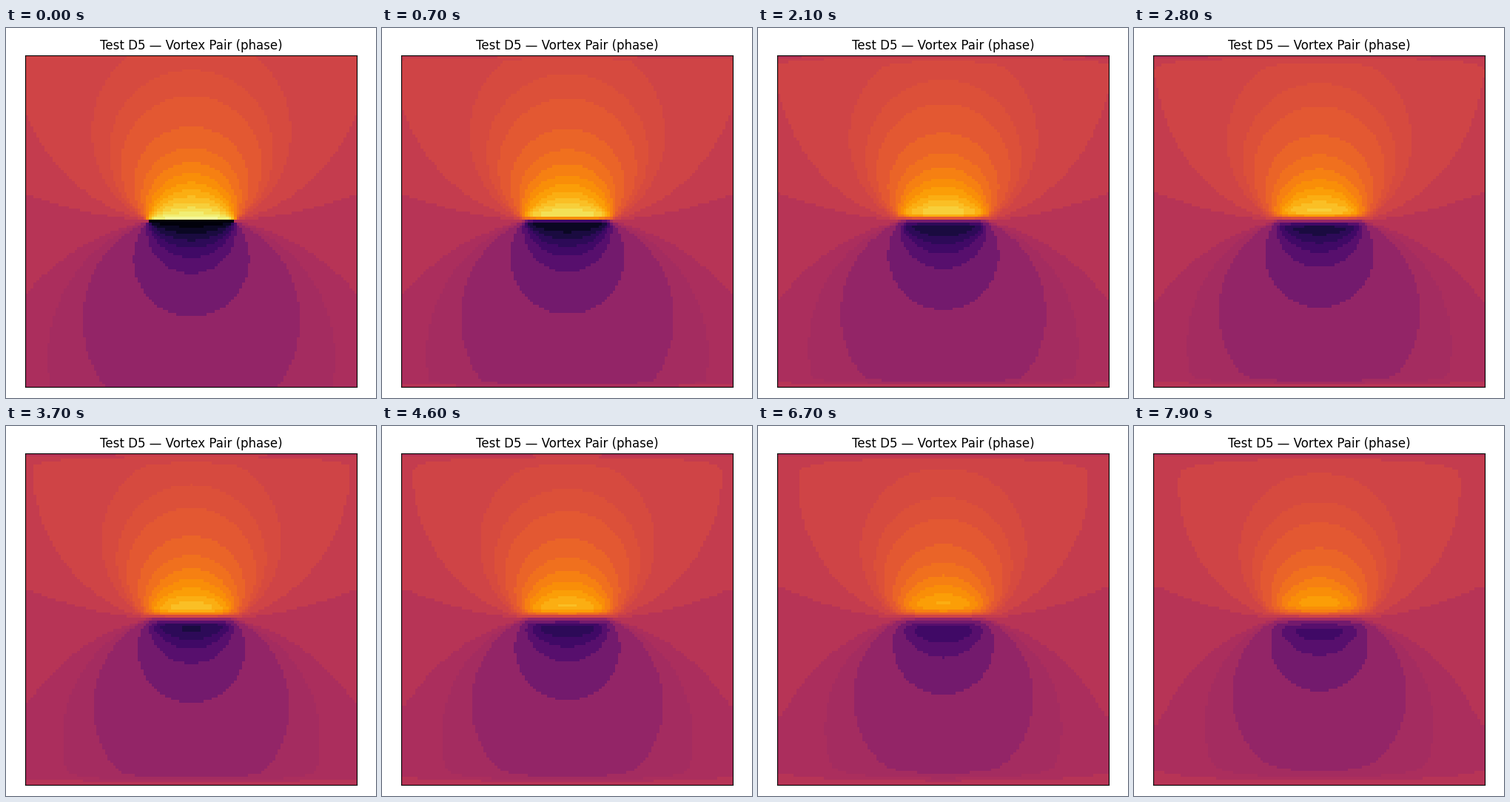
A matplotlib script for the animation above (8 s loop, 500 by 500 pixels).

```python
import matplotlib.pyplot as plt
import numpy as np
from matplotlib.animation import FuncAnimation
from matplotlib.colors import from_levels_and_colors

FRAMES = 80
INTERVAL = 100
CELLS = 121
HALF_GAP = 15.95      # vortex distance from the centre, in cells
DIFFUSION = 0.045     # per step
DAMPING = 0.003       # per step


def vortex_pair():
    axis = np.arange(CELLS) - CELLS // 2
    x, y = np.meshgrid(axis, axis)
    return np.arctan2(y, x + HALF_GAP) - np.arctan2(y, x - HALF_GAP)


def laplacian(field):
    shifts = ((1, 0), (-1, 0), (1, 1), (-1, 1))
    return sum(np.roll(field, step, axis) for step, axis in shifts) - 4 * field


def evolve(field, steps):
    history = [field]
    for _ in range(steps - 1):
        field = field + DIFFUSION * laplacian(field) - DAMPING * field
        history.append(field)
    return history


def banded_inferno():
    """Inferno in flat bands: broad in the purples, even elsewhere."""
    levels = np.concatenate([
        np.linspace(-3.15, -1.75, 6),
        np.linspace(-1.39, -0.86, 2),
        np.linspace(-0.415, -0.205, 3),
        np.linspace(0.09, 0.25, 2),
        np.linspace(0.456, 0.67, 3),
        np.linspace(0.865, 3.15, 12),
    ])
    middles = (levels[:-1] + levels[1:]) / 2
    colors = plt.get_cmap("inferno")(middles / (2 * np.pi) + 0.5)
    return from_levels_and_colors(levels, colors)


phases = evolve(vortex_pair(), FRAMES)
cmap, norm = banded_inferno()

plt.rcParams["font.family"] = "DejaVu Sans"
fig = plt.figure(figsize=(5, 5), dpi=100, facecolor="white")
ax = fig.add_axes([0.052, 0.03, 0.896, 0.896])
ax.set_title("Test D5 — Vortex Pair (phase)", fontsize=12)
image = ax.imshow(phases[0], cmap=cmap, norm=norm, interpolation="nearest")
ax.set_xticks([])
ax.set_yticks([])


def update(frame):
    image.set_data(phases[frame])
    return [image]


anim = FuncAnimation(fig, update, frames=FRAMES, interval=INTERVAL,
                     repeat=True, repeat_delay=0)
plt.show()
```
